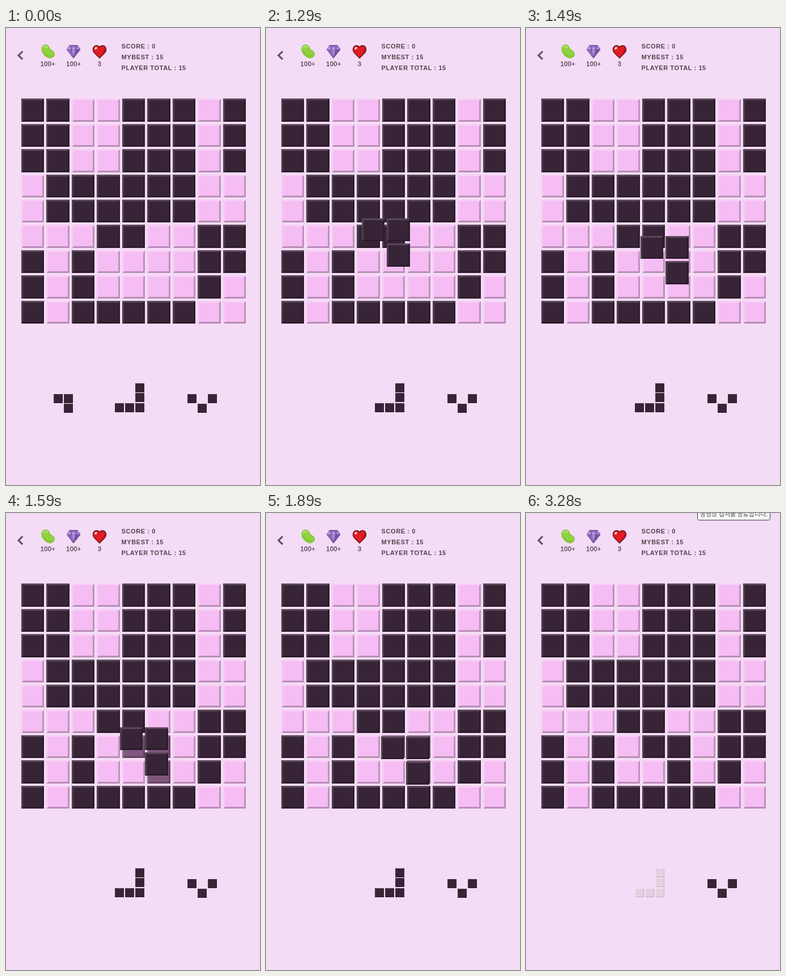
These frames come from a looping animation (448x804 px, 3.38 s). An HTML page:

```html
<!DOCTYPE html>
<html lang="en">
<head>
<meta charset="utf-8">
<title>Block puzzle</title>
<style>
html, body { margin: 0; width: 100%; height: 100%; overflow: hidden; background: #f5dcf6; }
svg { display: block; width: 100%; height: 100%; }
text { font-family: "Liberation Sans", Arial, sans-serif; font-size: 11px; fill: #51434f; }
.score { font-weight: bold; letter-spacing: .6px; }
.count { text-anchor: middle; letter-spacing: .4px; stroke: #51434f; stroke-width: .35px; }
.tip { font-family: "Noto Sans CJK KR", "Noto Sans CJK", sans-serif; fill: #4a4a4a; }
.crisp { shape-rendering: crispEdges; }
</style>
</head>
<body>
<svg viewBox="0 0 448 804" xmlns="http://www.w3.org/2000/svg">
  <rect width="448" height="804" fill="#f5dcf6"/>
  <path d="M29.3 41.2 22 48.2 29.3 55.2" fill="none" stroke="#604c62" stroke-width="3"/>

  <g id="bean">
    <path d="M64 33C66 29 72 28.500 75 32C77 35 77 37 80 39C85 41 87 46 84 50C80 54.500 73 53 68 48C63 43 62 37 64 33Z" fill="#90d13f" stroke="#72b52e"/>
    <path d="M66 35C67 31.500 71 31 73 34" fill="none" stroke="#bdea7b" stroke-width="1.800" stroke-linecap="round"/>
    <path d="M66 41C69 47 75 51 81 49" fill="none" stroke="#7bc034" stroke-width="1.500" stroke-linecap="round"/>
  </g>

  <g id="gem" stroke-linejoin="round">
    <path d="M112 30.500H126L131 38 119 53 107.500 38Z" fill="#9369c6" stroke="#59427f"/>
    <path d="M112 31 115 38H108ZM119 31 123 38H115Z" fill="#c3a4e5"/>
    <path d="M126 31 123 38H130ZM115 38H123L119 52Z" fill="#a98ad5"/>
    <path d="M123 38H130L119 52Z" fill="#7850ac"/>
    <path d="M108 38H130M115 38 119 52 123 38 119 31 115 38 112 31M123 38 126 31" fill="none" stroke="#694b93" stroke-width=".7"/>
  </g>

  <g id="heart">
    <path d="M165 53 156 44C151 38 154 31 160 31Q163 31 165 34Q167 31 170 31C176 31 179 38 174 44Z" fill="#e21c24" stroke="#581218" stroke-width="1.300"/>
    <path d="M165 51.500 174 42Q176.500 38 174 34Q174 43 165 51.500Z" fill="#ae101b"/>
    <ellipse cx="158.500" cy="35.500" rx="2.600" ry="1.800" transform="rotate(-40 158.500 35.500)" fill="#ffc9c9"/>
  </g>

  <text class="count" x="74" y="67">100+</text>
  <text class="count" x="119.500" y="67">100+</text>
  <text class="count" x="165" y="67">3</text>
  <text class="score" x="203.500" y="36">SCORE : 0</text>
  <text class="score" x="203.500" y="55">MYBEST : 15</text>
  <text class="score" x="203.500" y="74">PLAYER TOTAL : 15</text>

  <g class="crisp">
    <g id="board"></g>
    <g id="ghost"></g>
    <g id="placed"></g>
    <g id="trayA"></g>
    <g id="trayB"></g>
    <g id="trayBOff"></g>
    <g id="trayC"></g>
    <g id="drag"></g>
  </g>

  <g id="tip">
    <rect x="302.500" y="-8.500" width="128" height="21" rx="3" fill="#fbf8fb" stroke="#3c363c"/>
    <text class="tip" x="307" y="6">동영상 캡처를 종료합니다.</text>
  </g>
</svg>
<script>
const LOOP = 3380, PICK = 1190, SNAP = 1590, DROP = 2080, TIP = 3280;
const PITCH = 44.45, SIZE = 40.4, LEFT = 27, TOP = 124.2;
const DARK = '#382437', PINK = '#f5bdf3', GHOST = '#80557e', OFF = '#e5cfe3';
const ROWS = [
  '##..###.#', '##..###.#', '##..###.#',
  '.######..', '.######..', '...##..##',
  '#.#....##', '#.#....#.', '#.#####..'
];
const PIECE = [[0, 0], [1, 0], [1, 1]];
// Drag positions, one per 100 ms from PICK
const PATH = [[80, 372], [169, 335], [193, 348], [202, 366], [201, 377], [200, 384], [202, 390], [203, 393]];

const el = id => document.getElementById(id);
const show = (id, on) => el(id).setAttribute('display', on ? 'inline' : 'none');

// A tile with four mitred edges: light at top and left, dark at right and bottom
function tile(x0, y0, size, fill, edge, light, dark) {
  const x = Math.round(x0), y = Math.round(y0);
  const r = Math.round(x0 + size), b = Math.round(y0 + size), e = edge;
  const side = (points, color, alpha) => `<polygon points="${points}" fill="${color}" fill-opacity="${alpha}"/>`;
  return `<rect x="${x}" y="${y}" width="${r - x}" height="${b - y}" fill="${fill}"/>` +
    side([x, y, r, y, r - e, y + e, x + e, y + e], '#fff', light) +
    side([x, y, x + e, y + e, x + e, b - e, x, b], '#fff', light * .7) +
    side([r, y, r, b, r - e, b - e, r - e, y + e], '#000', dark) +
    side([x, b, x + e, b - e, r - e, b - e, r, b], '#000', dark * 1.1);
}

const bigTile = (x, y, fill) =>
  tile(x, y, SIZE, fill, 3, fill === PINK ? .25 : .17, fill === PINK ? .23 : .2);

const boardTile = (col, row, fill) => bigTile(LEFT + col * PITCH, TOP + row * PITCH, fill);

const trayPiece = (x, y, cells, fill) => cells.map(([c, r]) =>
  tile(x + c * 18, y + r * 17.5, 16, fill, 1, fill === OFF ? .45 : .12, .15)).join('');

function build() {
  const corner = [[2, 0], [2, 1], [0, 2], [1, 2], [2, 2]];
  el('board').innerHTML = ROWS.map((row, r) =>
    [...row].map((c, i) => boardTile(i, r, c === '#' ? DARK : PINK)).join('')).join('');
  for (const [id, fill] of [['ghost', GHOST], ['placed', DARK]])
    el(id).innerHTML = PIECE.map(([c, r]) => boardTile(4 + c, 6 + r, fill)).join('');
  el('drag').innerHTML = PIECE.map(([c, r]) => bigTile(c * PITCH, r * PITCH, DARK)).join('');
  el('trayA').innerHTML = trayPiece(84, 643.8, PIECE, DARK);
  el('trayB').innerHTML = trayPiece(192, 624.9, corner, DARK);
  el('trayBOff').innerHTML = trayPiece(192, 624.9, corner, OFF);
  el('trayC').innerHTML = trayPiece(320, 643.8, [[0, 0], [2, 0], [1, 1]], DARK);
}

function render(t) {
  const dragging = t >= PICK && t < DROP;
  show('trayA', t < PICK);
  show('drag', dragging);
  show('ghost', t >= SNAP && t < DROP);
  show('placed', t >= DROP);
  show('trayB', t < DROP);
  show('trayBOff', t >= DROP);
  show('tip', t >= TIP);
  if (dragging) {
    const step = Math.min(PATH.length - 1, Math.floor((t - PICK) / 100));
    el('drag').setAttribute('transform', `translate(${PATH[step]})`);
  }
}

build();
render(0);
const start = performance.now();
function tick() {
  render((performance.now() - start) % LOOP);
  requestAnimationFrame(tick);
}
requestAnimationFrame(tick);
</script>
</body>
</html>
```
